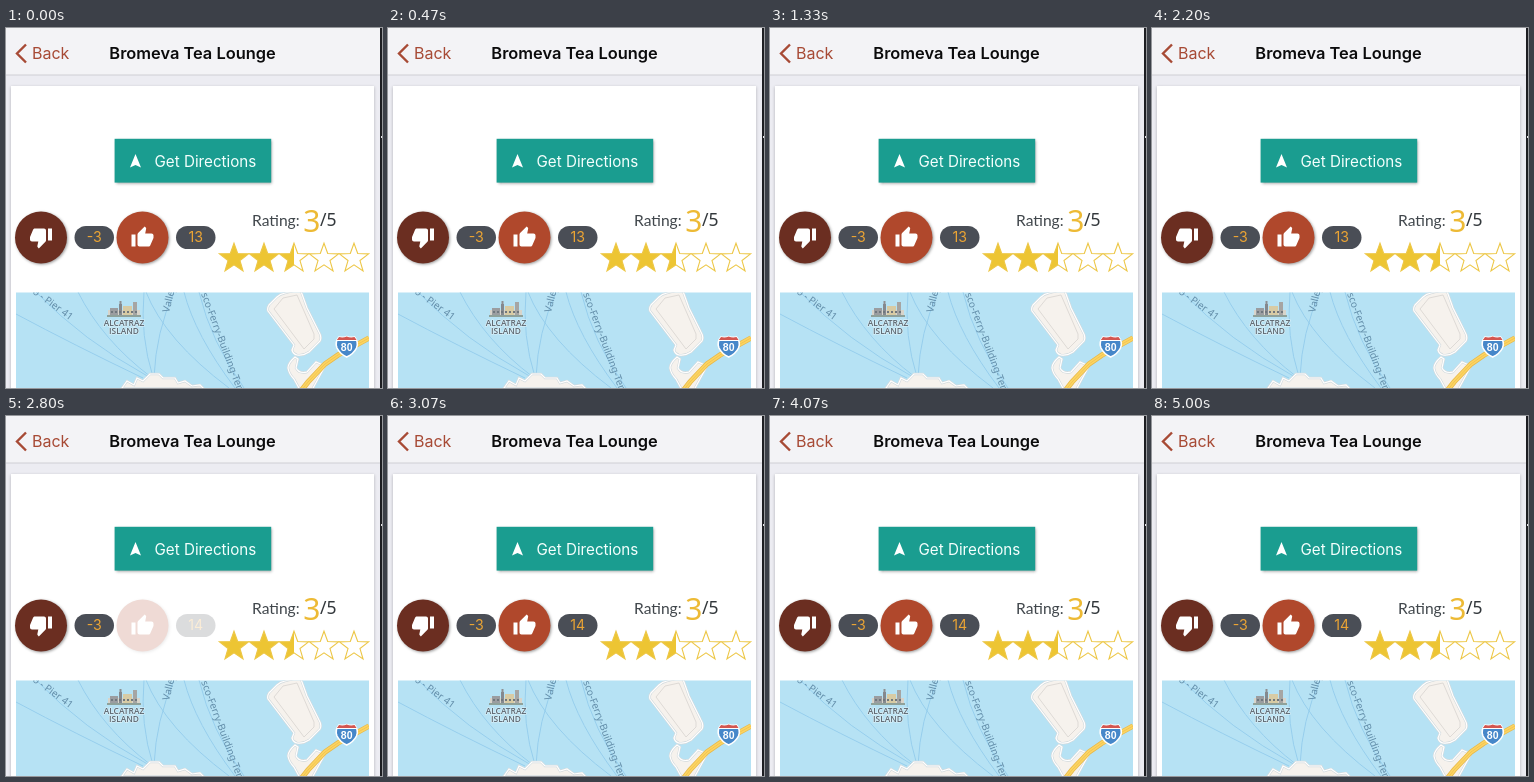
These frames come from a looping animation (376x360 px, 5.07 s). An HTML page with a canvas:

```html
<!DOCTYPE html>
<html lang="en">
<head>
<meta charset="utf-8">
<title>Place details</title>
<style>
html, body { margin: 0; width: 100%; height: 100%; overflow: hidden; background: #ececf2; }
canvas { display: block; width: 376px; height: 360px; }
</style>
</head>
<body>
<canvas id="stage"></canvas>
<script>
const LOOP = 5070, W = 376, H = 360;
const canvas = document.getElementById('stage');
const ctx = canvas.getContext('2d');
const dpr = window.devicePixelRatio || 1;
canvas.width = W * dpr;
canvas.height = H * dpr;

const THUMB = new Path2D('M1 21h4V9H1v12zm22-11c0-1.1-.9-2-2-2h-6.31l.95-4.57.03-.32c0-.41-.17-.79-.44-1.06L14.17 1 7.59 7.59C7.22 7.95 7 8.45 7 9v10c0 1.1.9 2 2 2h9c.83 0 1.54-.5 1.84-1.22l3.02-7.05c.09-.23.14-.47.14-.73v-2z');
const SHIELD = new Path2D('M333 309 Q337 310 340.7 308.5 Q344.5 310 348.5 309 Q353 314 350.5 320 Q347.5 326 340.7 329 Q334 326 331 320 Q328.5 314 333 309Z');
const TREASURE = new Path2D('M262 283 Q261 280 263 277 L271 269 Q274 266 279 265 L291 262 Q295 262 296 266 L301 280 L313 304 Q316 309 314 313 L303 324 Q297 328 291 327 Q287 326 286 322 L288 317Z');
const YERBA = new Path2D('M289 329 Q282 335 282 340 Q283 346 288 351 L294 362 L306 362 L319 338 L310 334 L301 344 Q293 346 290 340 L292 331Z');
const COAST = new Path2D('M116 360 L121 353 L128 357 L131 350 L137 353 L144 346 L153 346 L157 350 L169 350 L172 355 L179 353 L186 358 L194 357 L198 361Z');
const FERRIES = new Path2D('M10 286 Q68 317 137 350 M30 264 Q76 312 143 349 M72 264 Q96 312 145 349 M138 264 Q134 308 147 349 M168 264 Q150 304 148 349 M140 264 Q159 312 223 360 M178 264 Q189 307 229 360 M193 264 Q205 314 238 360');

function text(str, x, y, font, color, align = 'left') {
  ctx.font = font;
  ctx.fillStyle = color;
  ctx.textAlign = align;
  ctx.fillText(str, x, y);
}

function turnedText(str, x, y, deg, font, color) {
  ctx.save();
  ctx.translate(x, y);
  ctx.rotate(deg * Math.PI / 180);
  text(str, 0, 0, font, color);
  ctx.restore();
}

function rect(x, y, w, h, color) {
  ctx.fillStyle = color;
  ctx.fillRect(x, y, w, h);
}

function paint(path, fill, stroke, width) {
  if (fill) { ctx.fillStyle = fill; ctx.fill(path); }
  if (stroke) { ctx.strokeStyle = stroke; ctx.lineWidth = width; ctx.stroke(path); }
}

function withShadow(color, blur, dx, dy, draw) {
  ctx.save();
  ctx.shadowColor = color;
  ctx.shadowBlur = blur * dpr;
  ctx.shadowOffsetX = dx * dpr;
  ctx.shadowOffsetY = dy * dpr;
  draw();
  ctx.restore();
}

function polygon(points) {
  const p = new Path2D();
  points.forEach(([x, y]) => p.lineTo(x, y));
  p.closePath();
  return p;
}

function line(points, color, width) {
  ctx.beginPath();
  points.forEach(([x, y]) => ctx.lineTo(x, y));
  ctx.strokeStyle = color;
  ctx.lineWidth = width;
  ctx.stroke();
}

function header() {
  rect(0, 0, W, 47, '#f3f3f6');
  rect(0, 46.5, W, 1, '#cfcfd5');
  line([[20, 16.5], [11, 25.5], [20, 34.5]], '#a74a35', 2.4);
  text('Back', 26, 31, '16px Inter, sans-serif', '#a74a35');
  text('Bromeva Tea Lounge', 186.5, 31, '600 16.4px Inter, sans-serif', '#0b0b0c', 'center');
}

function directions() {
  withShadow('rgba(0,0,0,.4)', 3, 1, 1, () => rect(108.6, 110.8, 156.6, 43.8, '#1a9d90'));
  paint(polygon([[129.5, 126], [135, 139.5], [129.5, 137], [124, 139.5]]), '#fff');
  text('Get Directions', 148.5, 138.7, '15.2px Inter, sans-serif', '#f4fffd');
}

function vote(x, color, count, up) {
  withShadow('rgba(0,0,0,.4)', 3, 1, 1, () => {
    ctx.beginPath();
    ctx.arc(x, 209.4, 26, 0, Math.PI * 2);
    ctx.fillStyle = color;
    ctx.fill();
  });
  ctx.save();
  ctx.translate(x, 209.4);
  if (!up) ctx.rotate(Math.PI);
  ctx.translate(-12, -12);
  paint(THUMB, '#fff');
  ctx.restore();
  ctx.beginPath();
  ctx.roundRect(x + 33.5, 198, 39.5, 23, 11.5);
  ctx.fillStyle = '#4a4e56';
  ctx.fill();
  text(count, x + 53.3, 214.4, '14.2px Inter, sans-serif', '#eba434', 'center');
}

function star(cx, fill) {
  const points = [];
  for (let i = 0; i < 10; i++) {
    const r = i % 2 ? 6.3 : 15.4, a = i * Math.PI / 5 - Math.PI / 2;
    points.push([cx + r * Math.cos(a), 230.6 + r * Math.sin(a)]);
  }
  const p = polygon(points);
  ctx.save();
  ctx.beginPath();
  ctx.rect(cx - 16, 214, 32 * fill, 32);
  ctx.clip();
  paint(p, '#edc533');
  ctx.restore();
  paint(p, null, '#edc747', 1.1);
}

function rating() {
  text('Rating:', 246, 198, '15.6px Lato, sans-serif', '#41474c');
  text('3', 297.3, 203.5, '500 condensed 30px "Noto Sans", sans-serif', '#edba35');
  text('/5', 314, 198.3, '17.5px "Noto Sans", sans-serif', '#33383c');
  [1, 1, .5, 0, 0].forEach((fill, i) => star(228 + 30 * i, fill));
}

function landmark() {
  rect(102, 282, 32, 6, '#d8d4ca');
  rect(104, 280, 8, 8, '#9b9da0');
  rect(113, 276, 3, 12, '#85898e');
  rect(117, 278, 9, 10, '#d8cba4');
  rect(127, 274, 4, 14, '#a6a5a3');
  rect(113.5, 273, 2, 3, '#8d8f92');
  for (let x = 105; x < 132; x += 4) rect(x, 283, 2, 2, '#70777d');
  rect(101, 287, 34, 2, '#8fa19a');
  ctx.lineJoin = 'round';
  [['ALCATRAZ', 297.5], ['ISLAND', 305.5]].forEach(([s, y]) => {
    ctx.font = '600 8.4px "Open Sans", sans-serif';
    ctx.textAlign = 'center';
    ctx.strokeStyle = 'rgba(225,242,248,.7)';
    ctx.lineWidth = 1.6;
    ctx.strokeText(s, 118, y);
    text(s, 118, y, ctx.font, '#5d666f', 'center');
  });
  ctx.lineJoin = 'miter';
}

function routeSign() {
  paint(SHIELD, '#4687c9', '#fff', 1.6);
  ctx.save();
  ctx.clip(SHIELD);
  rect(328, 306, 26, 6, '#d35650');
  rect(328, 312, 26, 1, '#fff');
  ctx.restore();
  text('80', 340.7, 323, 'bold 10.5px "Liberation Sans", sans-serif', '#fff', 'center');
}

function map() {
  ctx.save();
  ctx.beginPath();
  ctx.rect(10, 264.5, 353, 96);
  ctx.clip();
  rect(10, 264, 353, 96, '#b6e2f4');
  paint(FERRIES, null, '#93ccec', .9);
  [TREASURE, YERBA, COAST].forEach(land => {
    paint(land, '#f6f2ed', '#d3dadd', 2.4);
    paint(land, null, '#fff', 1.2);
  });
  const shore = polygon([[268, 281], [277, 270], [291, 267], [308, 306], [308, 311], [298, 321]]);
  paint(shore, null, '#dedad6', 1);
  const road = [[295, 363], [302, 354], [319, 336], [332, 327], [363, 310]];
  line(road, '#e8b94a', 5.4);
  line(road, '#fbd463', 3.8);
  line(road, '#f3c04b', .8);
  const font = '10px "Noto Sans", sans-serif', color = '#618ca8';
  turnedText('o - Pier 41', 26, 265, 36, font, color);
  turnedText('Vallejo', 163, 285, -76, font, color);
  turnedText('sco-Ferry-Building-Terminal', 195, 266, 69.5, font, color);
  landmark();
  routeSign();
  ctx.restore();
}

function voteAlpha(t) {
  const d = Math.abs(t - 2800) / 200;
  return d >= 1 ? 1 : .2 + .8 * (1 - Math.cos(Math.PI * d)) / 2;
}

function draw(t) {
  ctx.setTransform(dpr, 0, 0, dpr, 0, 0);
  rect(0, 0, W, H, '#ececf2');
  header();
  withShadow('rgba(0,0,0,.25)', 3, 0, 1, () => rect(5, 58, 363, 310, '#fff'));
  directions();
  vote(35, '#6b2e21', '-3', false);
  vote(136.5, '#b0482c', t < 2700 ? '13' : '14', true);
  // The card is plain white here, so a veil equals group opacity.
  rect(108.3, 180, 104, 62, `rgba(255,255,255,${1 - voteAlpha(t)})`);
  rating();
  map();
  rect(374, 0, 2, H, '#1d1e22');
  rect(375, 108, 1, 2, '#e6e6ea');
}

const start = performance.now();
function tick() {
  draw((performance.now() - start) % LOOP);
  requestAnimationFrame(tick);
}
tick();
</script>
</body>
</html>
```
